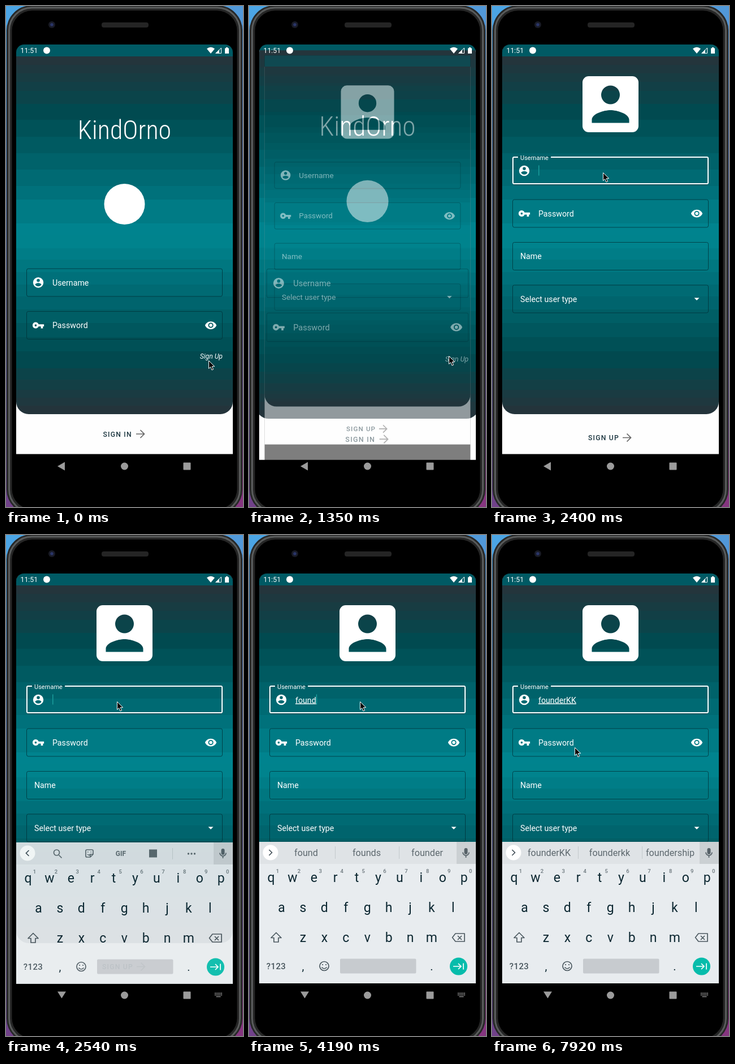
Write an HTML page that moves like this. It is 419 px wide and 885 px high and loops after 8000 ms.

```html
<!DOCTYPE html>
<html lang="en">
<head>
<meta charset="utf-8">
<title>Sign-up form</title>
<style>
  html, body { margin: 0; width: 100%; height: 100%; overflow: hidden; background: #000; }
  svg { display: block; width: 100%; height: 100%; font-family: Roboto, sans-serif; }
  .field { fill: none; stroke: #002f36; stroke-opacity: .75; }
  .input { font-size: 14.2px; fill: #fff; }
  .button { font-size: 12.2px; font-weight: 500; letter-spacing: 1.2px; fill: #1c3640; }
  .line { fill: none; stroke-width: 1.7; }
  .key { font-size: 23px; fill: #0c2731; text-anchor: middle; }
  .digit { font-size: 9.5px; font-weight: 500; fill: #6b767c; text-anchor: middle; }
  .hint { font-size: 16.2px; fill: #5d686e; text-anchor: middle; }
</style>
</head>
<body>
<svg viewBox="0 0 419 885" preserveAspectRatio="none">
  <defs>
    <linearGradient id="wall" gradientUnits="userSpaceOnUse" x1="0" y1="0" x2="250" y2="885">
      <stop stop-color="#4ba6e6"/><stop offset=".5" stop-color="#6272b4"/><stop offset=".88" stop-color="#65488f"/><stop offset="1" stop-color="#85357f"/>
    </linearGradient>
    <linearGradient id="bands" gradientUnits="userSpaceOnUse" x1="0" x2="0" y1="89" y2="721"/>
    <clipPath id="screen"><path d="M18 885V82a14 14 0 0 1 14-14H387a14 14 0 0 1 14 14V885z"/></clipPath>
    <path id="person" d="M12 2a10 10 0 1 0 0 20 10 10 0 0 0 0-20zm0 3a3 3 0 1 1 0 6 3 3 0 0 1 0-6zm0 14.2c-2.5 0-4.7-1.3-6-3.2 0-2 4-3.1 6-3.1s6 1.1 6 3.1c-1.3 1.9-3.5 3.2-6 3.2z"/>
    <path id="lock" d="M12.65 10a6 6 0 1 0 0 4H17v4h4v-4h2v-4zM7 14a2 2 0 1 1 0-4 2 2 0 0 1 0 4z"/>
    <path id="eye" d="M12 4.5C7 4.5 2.7 7.6 1 12c1.7 4.4 6 7.5 11 7.5s9.3-3.1 11-7.5c-1.7-4.4-6-7.5-11-7.5zM12 17a5 5 0 1 1 0-10 5 5 0 0 1 0 10zm0-8a3 3 0 1 0 0 6 3 3 0 0 0 0-6z"/>
    <path id="portrait" d="M3 5v14a2 2 0 0 0 2 2h14a2 2 0 0 0 2-2V5a2 2 0 0 0-2-2H5a2 2 0 0 0-2 2zm12 4a3 3 0 1 1-6 0 3 3 0 0 1 6 0zm-9 8c0-2 4-3.1 6-3.1s6 1.1 6 3.1v1H6z"/>
    <g id="page">
      <path fill="#000" d="M18 68h383v766H18z"/>
      <path fill="#fefefe" d="M18 89h383v702.5H18z"/>
      <path fill="#005a64" d="M18 68h383v22H18z"/>
      <path fill="url(#bands)" d="M18 89h383v610a22 22 0 0 1-22 22H40a22 22 0 0 1-22-22z"/>
    </g>
  </defs>

  <path fill="url(#wall)" d="M0 0h419v885H0z"/>
  <rect x="1" y="-1" width="417" height="899" rx="44" fill="#262727"/>
  <rect x="5.5" y="3" width="408" height="891" rx="40" fill="none" stroke="#5a5c5c" stroke-width="3"/>
  <rect x="9.5" y="7" width="400" height="883" rx="37" fill="#000" stroke="#262626" stroke-width="2"/>
  <circle cx="81" cy="33" r="6" fill="#191b26"/><circle cx="81" cy="33" r="2.8" fill="#2a3568"/>
  <rect x="169" y="29" width="83" height="9" rx="4" fill="#252525"/>

  <g clip-path="url(#screen)">
    <g id="login">
      <use href="#page"/>
      <text x="209.5" y="235" text-anchor="middle" font-size="46" font-weight="300" fill="#fff" style="font-family:'Roboto Condensed',Roboto,sans-serif;font-stretch:condensed">KindOrno</text>
      <circle id="badge" cx="209.5" cy="350" r="36" fill="#fff"/>
      <g id="loginFields"></g>
      <text x="383" y="623" text-anchor="end" font-size="12.2" font-style="italic" fill="#fff">Sign Up</text>
      <text class="button" x="171.5" y="760.5">SIGN IN</text>
      <path class="line" stroke="#666" d="M230 756h14.5m-7-7 7 7-7 7"/>
    </g>
    <g id="signup">
      <use href="#page"/>
      <use href="#portrait" fill="#fff" transform="translate(143.5 107.5) scale(5.5)"/>
      <g id="signupFields"></g>
      <path id="focus" fill="none" stroke="#fff" stroke-width="2" d="M46 267h-7a2 2 0 0 0-2 2v43a2 2 0 0 0 2 2h341a2 2 0 0 0 2-2v-43a2 2 0 0 0-2-2H104"/>
      <text id="floating" x="50" y="271.5" font-size="11" fill="#fff">Username</text>
      <text id="typed" class="input" x="82" y="296.5" text-decoration="underline"></text>
      <path id="caret" stroke="#1fa5a3" stroke-width="1.3" d="M0 281.5v18"/>
      <text class="button" x="170" y="767">SIGN UP</text>
      <path class="line" stroke="#666" d="M231 762.5h14.5m-7-7 7 7-7 7"/>
    </g>

    <g id="keyboard">
      <path fill="#e8ecef" d="M18 542h383v250H18z"/>
      <path fill="#dfe3e6" d="M18 542h383v39H18z"/>
      <path fill="#cbd0d3" d="M367 542h34v39h-34z"/>
      <circle cx="38" cy="561" r="13.5" fill="#fff"/>
      <path id="chevron" class="line" stroke="#435058" d="M-2.5-5 2.5 0-2.5 5"/>
      <g fill="#566168">
        <rect x="380.5" y="553" width="6" height="11" rx="3"/>
        <path class="line" stroke="#566168" stroke-width="1.5" d="M378 560.5a5.5 5.5 0 0 0 11 0m-5.5 5.5v4"/>
      </g>
      <g id="tools" fill="#5d686e" stroke="#5d686e">
        <path class="line" d="M93.5 564.5l5 5"/><circle class="line" cx="89.5" cy="560" r="5"/>
        <path class="line" d="M143 555h9a2 2 0 0 1 2 2v6l-5 5h-6a2 2 0 0 1-2-2v-9a2 2 0 0 1 2-2zm11 8h-5v5m-5-5q3 3 5 0m-5-4h1.5m4 0h1.5"/>
        <text x="203" y="566" font-size="12" font-weight="700" text-anchor="middle" stroke="none">GIF</text>
        <rect x="253" y="554.5" width="14" height="14" stroke="none"/>
        <path stroke="#c3c9cc" d="M294.5 552v20"/>
        <g stroke="none"><circle cx="322.5" cy="562" r="1.7"/><circle cx="328" cy="562" r="1.7"/><circle cx="333.5" cy="562" r="1.7"/></g>
      </g>
      <g id="hints">
        <path stroke="#c3c9cc" d="M152.5 550v22m113-22v22"/>
        <text class="hint" x="101" y="567"></text><text class="hint" x="208" y="567"></text><text class="hint" x="315" y="567"></text>
      </g>
      <g id="keys"></g>
      <g class="line" stroke="#4d5a61" stroke-width="1.6" stroke-linejoin="round">
        <path d="M48 702.5l-9 9h5v7.5h8v-7.5h5z"/>
        <path d="M365 704h16v14h-16l-5.5-7zm4 4 7 7m0-7-7 7"/>
        <circle cx="133" cy="761.5" r="8"/><path d="M128.5 763.5q4.5 5 9 0"/>
        <path stroke-width="2.2" stroke-linecap="round" d="M130 759h.1m5.9 0h.1"/>
      </g>
      <text x="48" y="767" font-size="15" font-weight="500" text-anchor="middle" fill="#46545b" letter-spacing=".4">?123</text>
      <text class="key" x="95.5" y="769" style="font-size:20px">,</text>
      <text class="key" x="323" y="769" style="font-size:20px">.</text>
      <rect x="161" y="748.5" width="134.5" height="26" rx="2" fill="#c7cbcf"/>
      <circle cx="370.5" cy="762" r="15.5" fill="#06bcab"/>
      <path class="line" stroke="#fff" stroke-width="2" d="M361 762h14m-5-5 5 5-5 5m9-10.5v11"/>
    </g>
  </g>

  <g fill="#fff">
    <text x="25.5" y="83" font-size="12.3">11:51</text>
    <circle cx="72" cy="78.5" r="6"/>
    <path d="M355 75.5q7-5.5 14 0l-7 8.5z"/>
    <path fill="none" stroke="#fff" d="M371 83.5h9.5V74z"/><path d="M370 84l7-7v7z"/>
    <path d="M387 74.5h2V73h3v1.5h2V84h-7z"/>
  </g>

  <g fill="#9b9b9b">
    <path id="back" d="M91 813l13-7.5v15z"/>
    <path id="down" d="M91 806.5h15l-7.5 12z"/>
    <circle cx="209.5" cy="813" r="6.5"/>
    <rect x="313.5" y="806.5" width="13" height="13" rx="1"/>
    <g id="imeIcon" fill="none" stroke="#8b8b8b">
      <path stroke-width="2" stroke-dasharray="1.8 1" d="M369 809.5h13m-13 3h13"/><path stroke-width="1.5" d="M371.5 815.5h8"/>
    </g>
  </g>
  <path id="pointer" fill="#000" stroke="#fff" stroke-linejoin="round" d="M.5.5v14l3.2-3 2.2 5.5 2.6-1-2.3-5.3h4.5z"/>
</svg>

<script>
const $ = id => document.getElementById(id);
const LOOP = 8000;

// Banded panel gradient: teal centre, deep teal, slate ends.
const edges = [89, 104, 119, 134, 150, 173, 201, 231, 260, 289, 318, 342, 384, 404, 428, 448,
  470, 492, 513, 536, 560, 585, 610, 640, 660, 678, 692, 706, 721];
const mix = (a, b, k) => a.map((v, i) => Math.round(v + (b[i] - v) * k));
function bandColor(y) {
  const d = Math.abs(y - 404) / 316, teal = [0, 134, 145], deep = [0, 74, 80], slate = [39, 51, 58];
  return d < .68 ? mix(teal, deep, d / .68) : mix(deep, slate, (d - .68) / .32);
}
$('bands').innerHTML = edges.slice(1).map((end, i) => {
  const start = edges[i], color = `rgb(${bandColor((start + end) / 2)})`;
  return [start, end].map(y => `<stop offset="${(y - 89) / 632}" stop-color="${color}"/>`).join('');
}).join('');

const icon = (name, x, y) => `<use href="#${name}" fill="#fff" transform="translate(${x - 11} ${y - 11}) scale(.92)"/>`;
const box = y => `<rect class="field" x="36.5" y="${y - 24.5}" width="346" height="49" rx="3"/>`;
const label = (text, x, y, id = '') => `<text class="input" id="${id}" x="${x}" y="${y + 5}">${text}</text>`;
const credentials = (user, pass, id) =>
  box(user) + icon('person', 57, user) + label('Username', 82, user, id) +
  box(pass) + icon('lock', 57, pass) + label('Password', 82, pass) + icon('eye', 362, pass);

$('loginFields').innerHTML = credentials(488.5, 564, 'loginUser');
$('signupFields').innerHTML = credentials(291, 366.5, 'resting') +
  box(442) + label('Name', 50, 442) + box(517.5) + label('Select user type', 50, 517.5) +
  '<path fill="#fff" d="M357.5 515.5h9l-4.5 4.5z"/>';

const rows = [['qwertyuiop', 39, 613], ['asdfghjkl', 57.5, 666], ['zxcvbnm', 95.5, 718.5]];
$('keys').innerHTML = rows.map(([letters, x0, y], row) => [...letters].map((c, i) => {
  const x = x0 + i * 37.9;
  const digit = row ? '' : `<text class="digit" x="${x + 11.5}" y="597">${(i + 1) % 10}</text>`;
  return `<text class="key" x="${x}" y="${y}">${c}</text>${digit}`;
}).join('')).join('');

// Each step overrides part of the state before it.
const steps = [
  [0, { x: 358, y: 626, lift: 0, login: 1, signup: 1, alpha: 0, focus: 0, kb: 0, drop: 0, text: '', hints: '', caret: 0 }],
  [150, { lift: 1 }],
  [300, { lift: 2 }],
  [450, { lift: 1, x: 357, y: 624 }],
  [600, { lift: 0, x: 355, y: 621 }],
  [750, { x: 353, y: 618, lift: 1 }],
  [900, { lift: 2 }],
  [1050, { lift: 1 }],
  [1200, { lift: 2 }],
  [1350, { login: 1.03, signup: .95, alpha: .5 }],
  [1500, { login: 1.05, signup: .996, alpha: 1 }],
  [1650, { signup: 1, x: 345, y: 600 }],
  [1800, { x: 290, y: 475 }],
  [1950, { x: 222, y: 335 }],
  [2100, { x: 196, y: 294 }],
  [2400, { focus: 1, caret: 1 }],
  [2540, { kb: .94, drop: 1 }],
  [2690, { kb: 1, drop: 0 }],
  [2840, { caret: 0 }],
  [3440, { caret: 1 }],
  [3590, { text: 'f', hints: 'for from' }],
  [3740, { text: 'fo', hints: 'for food' }],
  [3890, { text: 'fou', hints: 'four found' }],
  [4040, { text: 'foun', hints: 'found fount' }],
  [4190, { text: 'found', hints: 'founds founder' }],
  [4490, { text: 'founde', hints: 'founder founded' }],
  [4940, { caret: 0 }],
  [5230, { text: 'founder', hints: 'foundership founders', caret: 1 }],
  [5680, { caret: 0 }],
  [6130, { caret: 1 }],
  [6730, { caret: 0 }],
  [7020, { text: 'founderK', hints: 'founders foundership', caret: 1 }],
  [7170, { text: 'founderKK', hints: 'founderkk foundership' }],
  [7620, { caret: 0, x: 193, y: 299 }],
  [7770, { x: 171, y: 334 }],
  [7920, { x: 146, y: 375 }]
];
let state = {};
const timeline = steps.map(([at, change]) => ({ at, ...(state = { ...state, ...change }) }));

const show = (id, on) => $(id).setAttribute('opacity', +on);
const move = (id, value) => $(id).setAttribute('transform', value);
const zoom = s => `translate(209.5 451) scale(${s}) translate(-209.5 -451)`;
const hintTexts = $('hints').querySelectorAll('text');

function render(s) {
  move('pointer', `translate(${s.x} ${s.y})`);
  move('badge', `translate(0 ${-s.lift})`);
  move('login', zoom(s.login));
  move('signup', zoom(s.signup));
  show('signup', s.alpha);
  show('focus', s.focus);
  show('floating', s.focus);
  show('resting', !s.focus);
  show('keyboard', s.kb);
  move('keyboard', `translate(0 ${s.drop})`);
  show('back', !s.kb);
  show('down', s.kb > 0);
  show('imeIcon', s.kb > 0);
  show('tools', !s.text);
  show('hints', !!s.text);
  move('chevron', `translate(38 561) scale(${s.text ? 1 : -1} 1)`);
  [s.text, ...s.hints.split(' ')].forEach((word, i) => hintTexts[i].textContent = word);
  $('typed').textContent = s.text;
  move('caret', `translate(${82.8 + (s.text ? $('typed').getComputedTextLength() : 0)} 0)`);
  show('caret', s.caret);
}

const origin = performance.now();
let current;
function tick() {
  const time = (performance.now() - origin) % LOOP;
  const next = timeline.findLast(s => s.at <= time) || timeline[0];
  if (next !== current) render(current = next);
  requestAnimationFrame(tick);
}
tick();
</script>
</body>
</html>
```
